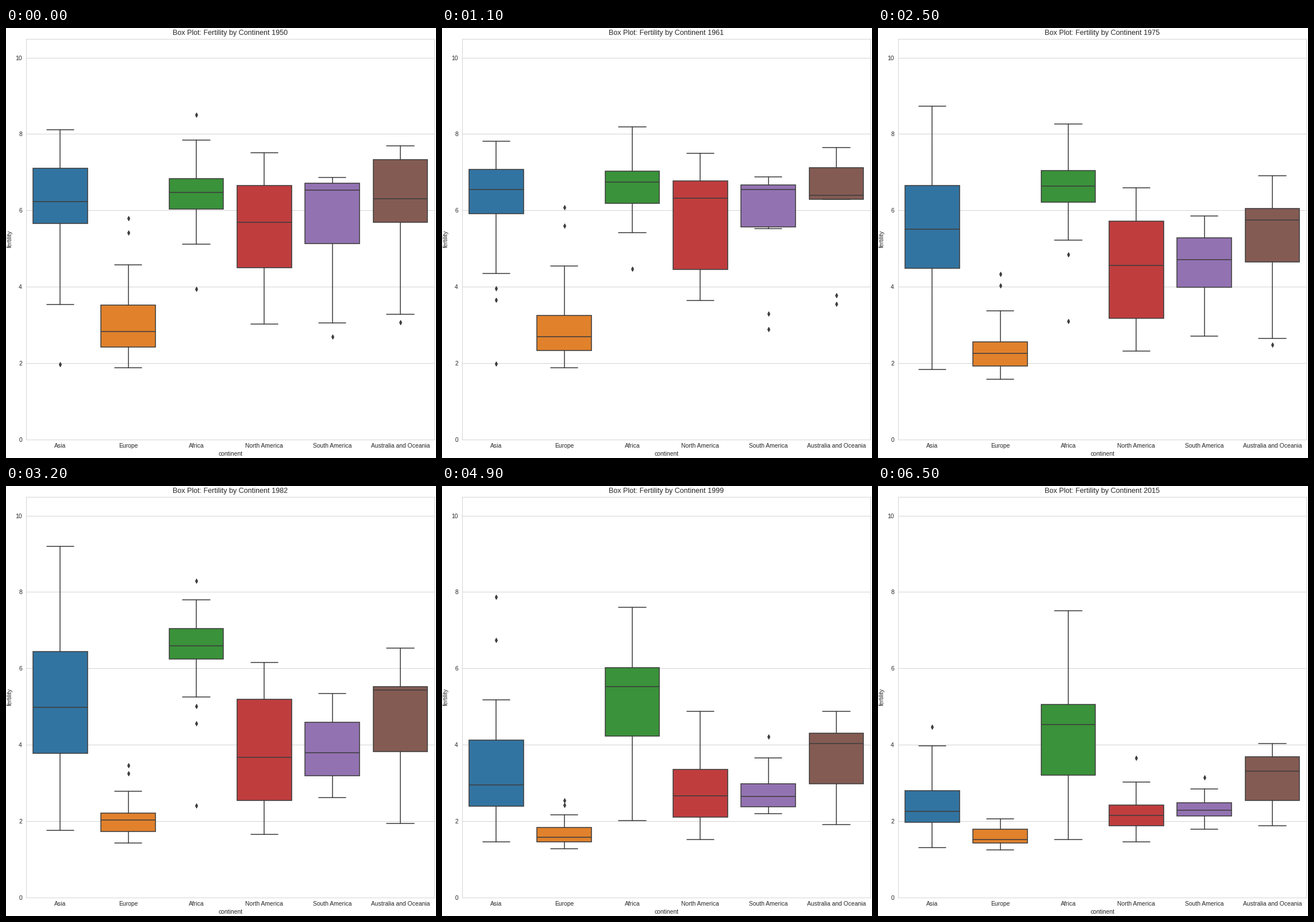
These frames come from a looping animation (748x748 px, 6.6 s). A matplotlib script:

```python
import numpy as np
import matplotlib.pyplot as plt
from matplotlib.animation import FuncAnimation

SIZE = 748
DPI = 74.8
FIRST, PEAK, TURN, LAST = 1950, 1961, 1982, 2015
INK = "#3d3d3d"
GRID = "#cccccc"

plt.rcParams.update({
    "font.family": "Liberation Sans",
    "font.size": 10,
    "text.color": "0.15",
    "axes.labelcolor": "0.15",
    "axes.edgecolor": GRID,
    "axes.linewidth": 0.8,
    "axes.axisbelow": True,
    "lines.solid_capstyle": "round",
})


def path(first, peak, turn, last, pace=1.5):
    """Straight up to TURN, then easing out towards the last value."""
    def value(year):
        if year <= TURN:
            return np.interp(year, [FIRST, PEAK, TURN], [first, peak, turn])
        left = (LAST - year) / (LAST - TURN)
        return last + (turn - last) * left ** pace
    return value


class Group:
    """Quartile paths plus tails spread from an extreme towards the box."""

    def __init__(self, name, color, q1, med, q3, low, high,
                 low_spread=(), high_spread=()):
        self.name, self.color = name, color
        self.box = q1, med, q3
        self.low, self.high = low, high
        self.low_spread = np.array([0, *low_spread])
        self.high_spread = np.array([0, *high_spread])

    def stats(self, year):
        q1, med, q3 = (p(year) for p in self.box)
        low, high = self.low(year), self.high(year)
        tails = np.concatenate([low + (q1 - low) * self.low_spread,
                                high + (q3 - high) * self.high_spread])
        reach = 1.5 * (q3 - q1)
        inside = (tails >= q1 - reach) & (tails <= q3 + reach)
        return dict(q1=q1, med=med, q3=q3,
                    whislo=min(q1, *tails[inside]),
                    whishi=max(q3, *tails[inside]),
                    fliers=tails[~inside])


groups = [
    Group("Asia", "#3274a1",
          q1=path(5.65, 5.92, 3.77, 1.96, pace=2),
          med=path(6.23, 6.54, 4.98, 2.25, pace=1.9),
          q3=path(7.11, 7.08, 6.44, 2.79, pace=1.4),
          low=path(1.96, 1.98, 1.75, 1.31),
          high=path(8.11, 7.81, 9.19, 4.47, pace=0.45),
          low_spread=(0.425, 0.5, 0.6), high_spread=(0.3, 0.72)),
    Group("Europe", "#e1812c",
          q1=path(2.42, 2.33, 1.72, 1.42, pace=3),
          med=path(2.82, 2.69, 2.03, 1.52, pace=3),
          q3=path(3.52, 3.24, 2.21, 1.79, pace=3),
          low=path(1.87, 1.88, 1.43, 1.25, pace=3),
          high=path(5.80, 6.08, 3.46, 2.06),
          high_spread=(0.17, 0.54, 0.85)),
    Group("Africa", "#3a923a",
          q1=path(6.04, 6.18, 6.24, 3.20),
          med=path(6.47, 6.74, 6.59, 4.52, pace=1),
          q3=path(6.83, 7.03, 7.05, 5.05, pace=1),
          low=path(3.94, 4.46, 2.41, 1.51, pace=0.8),
          high=path(8.51, 8.19, 8.30, 7.51, pace=3),
          low_spread=(0.56, 0.68, 0.74), high_spread=(0.4,)),
    Group("North America", "#c03d3e",
          q1=path(4.49, 4.45, 2.54, 1.87),
          med=path(5.69, 6.32, 3.67, 2.14),
          q3=path(6.65, 6.77, 5.19, 2.42),
          low=path(3.02, 3.64, 1.65, 1.45),
          high=path(7.51, 7.49, 6.15, 3.66, pace=1),
          high_spread=(0.51,)),
    Group("South America", "#9372b2",
          q1=path(5.13, 5.57, 3.19, 2.13, pace=2),
          med=path(6.53, 6.54, 3.79, 2.29, pace=2),
          q3=path(6.71, 6.67, 4.58, 2.48, pace=2),
          low=path(2.69, 2.89, 2.62, 1.78, pace=1),
          high=path(6.86, 6.87, 5.34, 3.14, pace=1),
          low_spread=(0.15, 0.98), high_spread=(0.45,)),
    Group("Australia and Oceania", "#845b53",
          q1=path(5.68, 6.29, 3.82, 2.54),
          med=path(6.31, 6.40, 5.43, 3.31),
          q3=path(7.33, 7.12, 5.52, 3.68),
          low=path(3.07, 3.55, 1.94, 1.88),
          high=path(7.69, 7.65, 6.53, 4.03),
          low_spread=(0.08,)),
]
slots = range(len(groups))

fig = plt.figure(figsize=(SIZE / DPI, SIZE / DPI), dpi=DPI, facecolor="white")
ax = fig.add_axes([35.2 / SIZE, 32.48 / SIZE, 710 / SIZE, 697 / SIZE])
ax.set(xlim=(-0.5, 5.5), ylim=(0, 10.5), xlabel="continent", ylabel="fertility")
ax.set_xticks(slots, [g.name for g in groups])
ax.set_yticks(range(0, 11, 2))
ax.tick_params(length=0, pad=7, labelcolor="0.15")
ax.tick_params(axis="x", pad=6)
ax.grid(axis="y", color=GRID, lw=0.8)
title = ax.set_title("", fontsize=12)

line = dict(color=INK, lw=1.5)
drawn = []


def update(i):
    year = FIRST + i
    while drawn:
        drawn.pop().remove()
    title.set_text(f"Box Plot: Fertility by Continent {year}")
    parts = ax.bxp(
        [g.stats(year) for g in groups],
        positions=slots, widths=0.8, capwidths=0.4,
        patch_artist=True, manage_ticks=False,
        boxprops=dict(edgecolor=INK, lw=1.5),
        medianprops=line, whiskerprops=line, capprops=line,
        flierprops=dict(marker="d", markersize=5, ls="none",
                        markerfacecolor=INK, markeredgecolor=INK))
    for box, group in zip(parts["boxes"], groups):
        box.set_facecolor(group.color)
    for artists in parts.values():
        drawn.extend(artists)
    return drawn


anim = FuncAnimation(fig, update, frames=LAST - FIRST + 1, interval=100,
                     init_func=lambda: [], repeat=True, repeat_delay=0)
plt.show()
```
